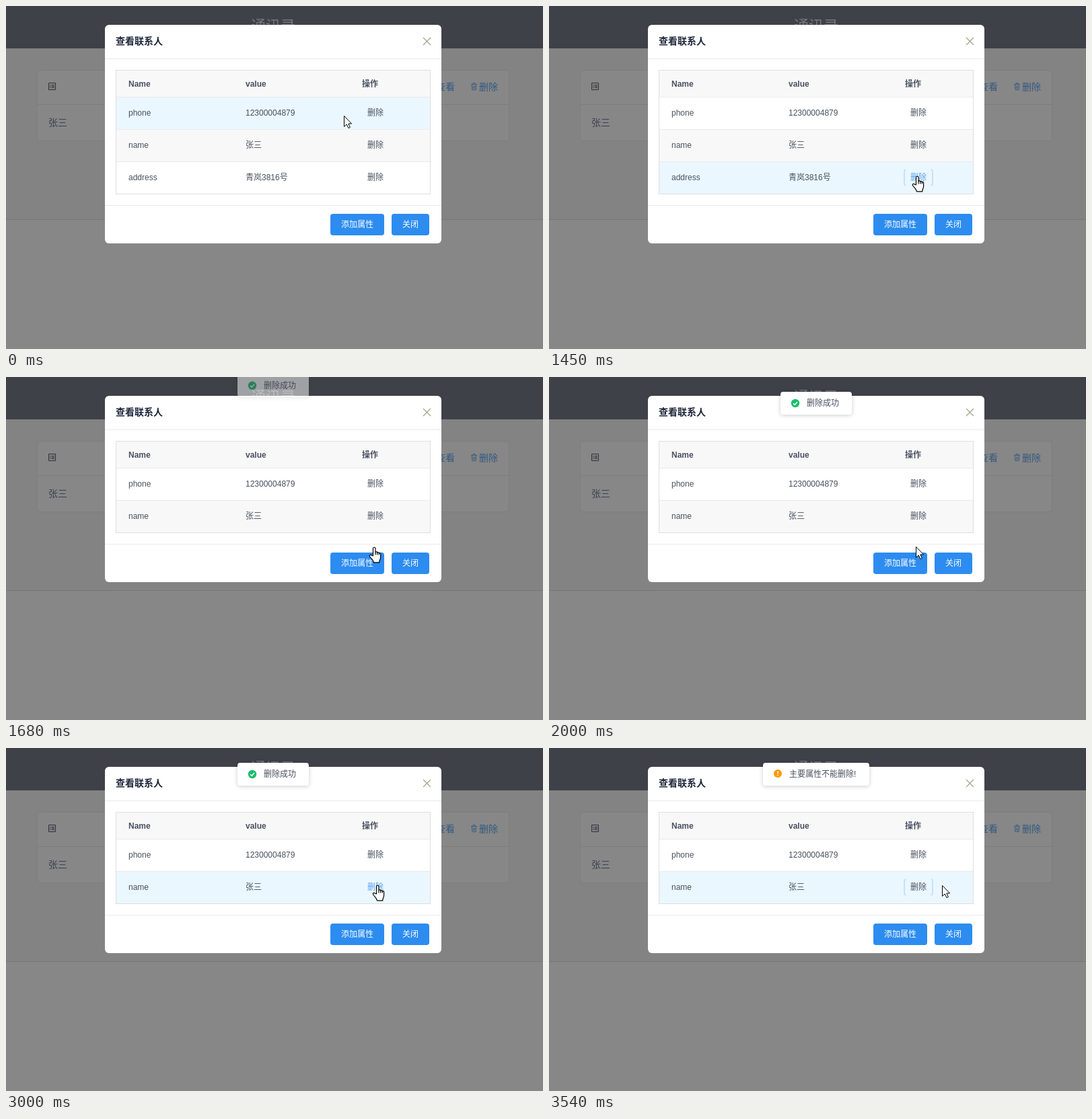
Recreate the animation shown at these times as an HTML page. Size 798 by 510 pixels, loop 4.49 s.

```html
<!DOCTYPE html>
<html lang="zh">
<head>
<meta charset="utf-8">
<style>
html, body { margin: 0; width: 100%; height: 100%; overflow: hidden; background: #878787; }
svg { display: block; width: 100%; height: 100%; }
text { font: 12px "Liberation Sans", "Noto Sans CJK SC", "Noto Sans CJK", sans-serif; fill: #495060; white-space: pre; }
.b { font-weight: bold; }
.w { fill: #fff; }
.m { font-size: 14px; }
.line { stroke: #e9eaec; }
.blue { fill: #335981; }
.toast > rect { fill: #fff; filter: drop-shadow(0 1px 3px rgba(0,0,0,.2)); }
.ring { fill: none; stroke: #2d8cf0; stroke-opacity: .2; stroke-width: 2; }
.cursor { fill: #fff; stroke: #000; stroke-linejoin: round; }
</style>
</head>
<body>
<svg viewBox="0 0 798 510">
  <!-- dimmed page -->
  <rect width="798" height="510" fill="#878787"/>
  <rect y="63" width="798" height="254" fill="#838383"/>
  <path d="M0 317.5H798" stroke="#767676"/>
  <rect width="798" height="63" fill="#3e4147"/>
  <text x="364" y="37" style="font-size:22px;fill:#73777e">通讯录</text>
  <rect x="46.5" y="95.5" width="701" height="105" rx="4" fill="#878787" stroke="#7d7d7d"/>
  <path d="M47 146.5H747" stroke="#7d7d7d"/>
  <path d="M63.5 114.5h10v10h-10zM65 117.5h1.3M67.5 117.5h4.5M65 119.5h1.3M67.5 119.5h4.5M65 121.5h1.3M67.5 121.5h4.5" fill="none" stroke="#2c2f36"/>
  <text class="m" x="63" y="178" style="fill:#3e4250">张三</text>
  <text class="m blue" x="639" y="125">查看</text>
  <text class="m blue" x="703" y="125">删除</text>
  <path d="M691 116.5h9M694 116v-1.5h3v1.5M692.3 117l.5 7.5h5.4l.5-7.5M694.5 118.5v4.5M696.5 118.5v4.5" fill="none" stroke="#335981" stroke-width=".9"/>

  <!-- dialog -->
  <rect id="box" x="147" y="28" width="500" height="325" rx="6" fill="#fff"/>
  <text class="m b" x="163" y="57" style="fill:#1c2438">查看联系人</text>
  <path d="M620 47l11 11M631 47l-11 11" stroke="#a0a085" stroke-width="1.1"/>
  <path class="line" d="M147 78.5H647"/>
  <rect x="164" y="96" width="466" height="39" fill="#f8f8f9"/>
  <text class="b" x="182" y="120">Name</text>
  <text class="b" x="356" y="120">value</text>
  <text class="b" x="529" y="120">操作</text>
  <g id="rows"></g>
  <rect id="frame" x="163.5" y="95.5" width="467" height="184" fill="none" stroke="#dddee1"/>
  <g id="foot">
    <path class="line" d="M147 296.5H647"/>
    <rect x="482" y="309" width="80" height="32" rx="4" fill="#2d8cf0"/>
    <rect x="573" y="309" width="56" height="32" rx="4" fill="#2d8cf0"/>
    <text class="w" x="498" y="329">添加属性</text>
    <text class="w" x="589" y="329">关闭</text>
  </g>

  <!-- messages -->
  <g id="done" class="toast">
    <rect x="344" y="22" width="106" height="34" rx="4"/>
    <circle cx="366" cy="39" r="6.2" fill="#19be6b"/>
    <path d="M363 39.2l2.2 2.2 3.8-4.4" fill="none" stroke="#fff" stroke-width="1.5"/>
    <text x="383" y="43">删除成功</text>
  </g>
  <g id="warn" class="toast">
    <rect x="318" y="22" width="158" height="34" rx="4"/>
    <circle cx="340" cy="38" r="6" fill="#f90"/>
    <path d="M340 34.5v4.3M340 40v1.6" stroke="#fff" stroke-width="1.5"/>
    <text x="357" y="43">主要属性不能删除!</text>
  </g>

  <g id="arrow" class="cursor">
    <path d="M.5.5V16.4L4.2 13 7 18.6 9.4 17.5 6.8 12H11.6Z"/>
  </g>
  <g id="hand" class="cursor" stroke-width="1.2">
    <path d="M.5 14V3a1.75 1.75 0 0 1 3.5 0V8.5c.5-1 2.7-.8 2.8.7 .5-1 2.5-.7 2.6.8 .6-.8 2.2-.4 2.2 1V16c0 3-1.8 4-1.8 7.8H1.4C1 20.500-2 18.500-4.300 15 -5.500 13-3.500 11.500-1.800 13Z"/>
    <path d="M4 8.500V12.500M6.800 9.200V12.500M9.400 10V12.500" fill="none"/>
  </g>
</svg>
<script>
const LOOP = 4490, REMOVED = 1530, DROP = 53;
const $ = id => document.getElementById(id);
const ramp = (t, a, b) => {
  const p = Math.min(1, Math.max(0, (t - a) / (b - a)));
  return p * p * (3 - 2 * p);
};
const within = (t, [a, b]) => t >= a && t < b;
const move = (el, x, y) => el.setAttribute("transform", `translate(${x} ${y})`);
const show = (el, on) => { el.style.display = on ? "" : "none"; };

// over: row highlighted; link: button hovered; ring: button focused (ms)
const rows = [
  { cells: ["phone", "12300004879"], over: [[-999, 330]], link: [], ring: [] },
  { cells: ["name", "张三"], over: [[330, 470], [2100, 9999]], link: [2780, 3430], ring: [3160, 9999] },
  { cells: ["address", "青岚3816号"], over: [[470, 9999]], link: [880, REMOVED], ring: [1450, REMOVED] }
];

rows.forEach((row, i) => {
  const y = 136 + 48 * i;
  const [a, b] = row.cells;
  $("rows").insertAdjacentHTML("beforeend", `<g>
    <path class="line" d="M164 ${y - .5}H630"/>
    <rect x="164" y="${y}" width="466" height="47" fill="${i % 2 ? "#f8f8f9" : "#fff"}"/>
    <rect class="over" x="164" y="${y}" width="466" height="47" fill="#ebf7ff"/>
    <text x="182" y="${y + 27}">${a}</text>
    <text x="356" y="${y + 27}">${b}</text>
    <path class="ring" d="M530 ${y + 59 - 48 + 48 - 0}"/>
    <text class="del" x="537" y="${y + 27}">删除</text></g>`);
  row.el = $("rows").lastElementChild;
  row.part = name => row.el.querySelector(name);
  row.part(".ring").setAttribute("d",
    `M530.5 ${y + 59.5}q-2.500 0-2.500 2.500v18q0 2.500 2.500 2.500M567.500 ${y + 59.5}q2.500 0 2.500 2.500v18q0 2.500-2.500 2.500`);
  row.part(".ring").setAttribute("transform", "translate(0 -48)");
});

const path = [
  [170, 502, 163], [670, 495, 253],
  [720, 495, 253], [980, 545, 252],
  [1990, 545, 252], [2400, 439, 196], [2520, 450, 200], [2610, 527, 215],
  [2680, 527, 215], [3060, 552, 202],
  [3310, 552, 202], [3530, 584, 204]
];

function pointer(t) {
  const i = path.findIndex(k => k[0] > t);
  if (i === 0) return path[0].slice(1);
  if (i < 0) return path[path.length - 1].slice(1);
  const [a, x, y] = path[i - 1], [b, u, v] = path[i], p = ramp(t, a, b);
  return [x + (u - x) * p, y + (v - y) * p];
}

function draw() {
  const t = performance.now() % LOOP;
  const cut = t >= REMOVED ? 48 : 0;

  rows.forEach(({ el, part, over, link, ring }) => {
    part(".over").style.opacity = over.reduce((s, [a, b]) => s + ramp(t, a, a + 200) - ramp(t, b, b + 200), 0);
    part(".del").style.fill = within(t, link) ? "#57a3f3" : "#495060";
    show(part(".ring"), within(t, ring));
  });
  show(rows[2].el, !cut);
  $("box").setAttribute("height", 325 - cut);
  $("frame").setAttribute("height", 184 - cut);
  move($("foot"), 0, -cut);

  const enter = ramp(t, 1530, 1830), leave = ramp(t, 3030, 3330);
  move($("done"), 0, -DROP * (1 - enter + leave));
  $("done").style.opacity = enter * (1 - leave * leave);

  // the second message sits below the first until that one is gone
  const rise = ramp(t, 3150, 3450);
  move($("warn"), 0, (t < 3330 ? DROP + .5 : 0) - DROP * (1 - rise));
  $("warn").style.opacity = rise;

  const hand = within(t, [880, 2000]) || within(t, rows[1].link);
  show($("hand"), hand);
  show($("arrow"), !hand);
  move($(hand ? "hand" : "arrow"), ...pointer(t).map(Math.round));
  requestAnimationFrame(draw);
}
draw();
</script>
</body>
</html>
```
